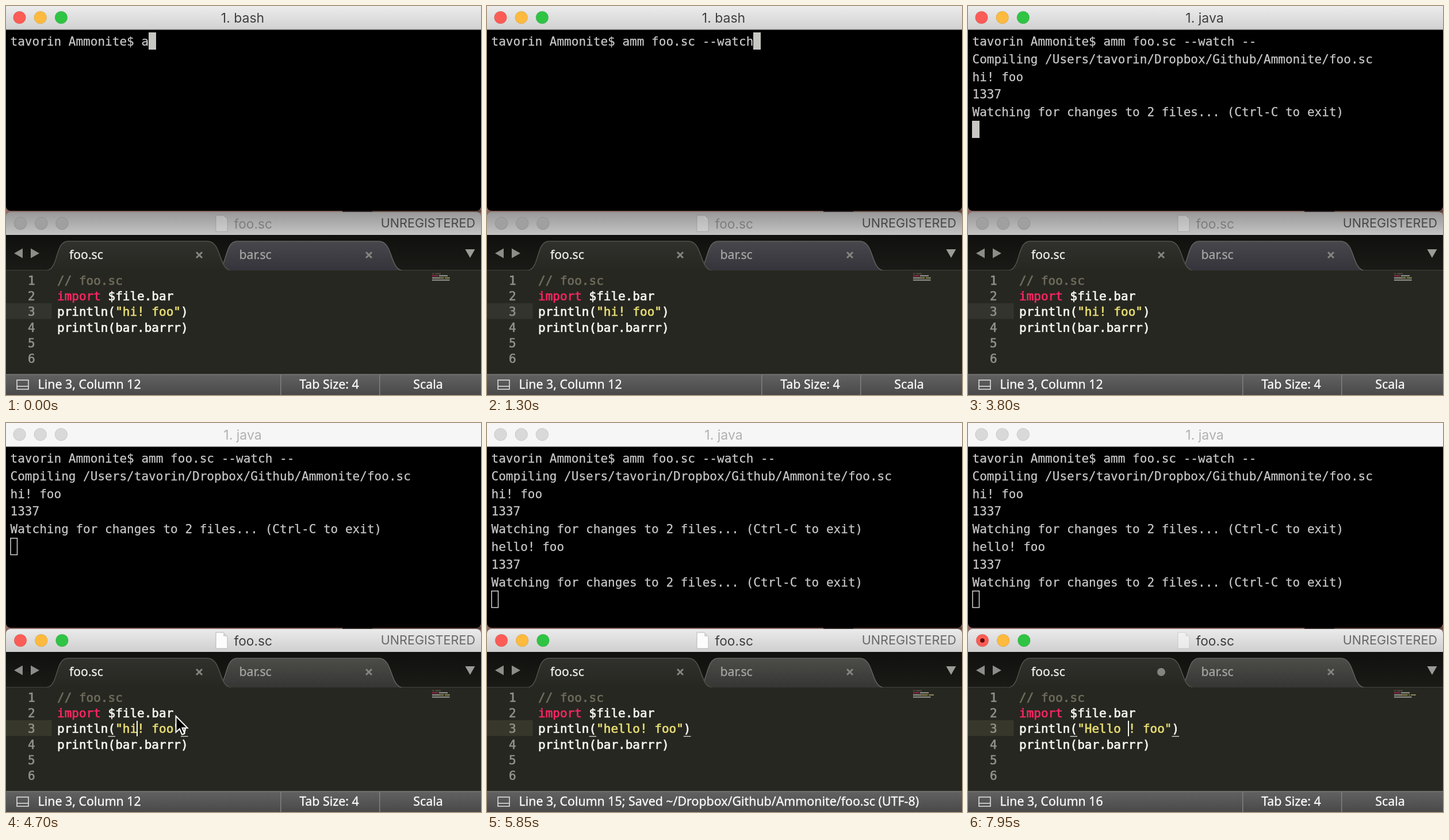
Recreate the animation shown at these times as an HTML page with a canvas. Size 826x678 px, loop 8 s.

```html
<!DOCTYPE html>
<html lang="en">
<head>
<meta charset="utf-8">
<title>Watching a script</title>
<style>
  html, body { margin: 0; width: 100%; height: 100%; overflow: hidden; background: #000; }
  canvas { display: block; }
</style>
</head>
<body>
<canvas id="stage" width="826" height="678"></canvas>
<script>
const W = 826, H = 678, LOOP = 8000;
const ctx = document.getElementById('stage').getContext('2d');

const MONO = '"DejaVu Sans Mono", monospace';
const TITLE = 'Inter, sans-serif';
const UI = '"Noto Sans", sans-serif';
const LIGHTS = ['#fb5c56', '#fdba3e', '#2fc444'];
const WHITE = '#f8f8f2', YELLOW = '#e6db74', PINK = '#f92662', GREY = '#6e6b5c';

// Terminal timing
const KEY = 73, ENTER = 1800, RENAME = 1850, COMPILE = 2700, RUN = 3300, RERUN = 5600;
// Editor timing
const FOCUS = 4400, SAVE = 5400;
const COMMAND = 'amm foo.sc --watch --';
const PROMPT = 'tavorin Ammonite$ ';
const WATCHING = 'Watching for changes to 2 files... (Ctrl-C to exit)';

// Each edit: time and the word before "! foo"
const edits = [[0, 'hi'], [4900, 'h']];
function typeWord(start, step, words) {
  words.forEach((word, i) => edits.push([start + i * step, word]));
}
typeWord(5000, 80, ['he', 'hel', 'hell', 'hello']);
typeWord(6900, 75, ['hell', 'hel', 'he', 'h', '']);
typeWord(7350, 100, ['H', 'He', 'Hel', 'Hell', 'Hello', 'Hello ']);
const FIRST_EDIT = 4900, SECOND_EDIT = 6900;

function rect(x, y, w, h, color) {
  ctx.fillStyle = color;
  ctx.fillRect(x, y, w, h);
}

function text(str, x, y, font, color, align = 'left') {
  ctx.font = font;
  ctx.fillStyle = color;
  ctx.textAlign = align;
  ctx.fillText(str, x, y);
}

// Text with slightly thickened strokes
function heavyText(str, x, y, font, color, heft, align) {
  text(str, x, y, font, color, align);
  ctx.strokeStyle = color;
  ctx.lineWidth = heft;
  ctx.lineJoin = 'round';
  ctx.strokeText(str, x, y);
  ctx.lineJoin = 'miter';
}

function shade(y0, y1, top, bottom) {
  const g = ctx.createLinearGradient(0, y0, 0, y1);
  g.addColorStop(0, top);
  g.addColorStop(1, bottom);
  return g;
}

function poly(points, fill) {
  ctx.beginPath();
  points.forEach(([x, y]) => ctx.lineTo(x, y));
  ctx.closePath();
  ctx.fillStyle = fill;
  ctx.fill();
}

function disc(x, y, r, fill, edge) {
  ctx.beginPath();
  ctx.arc(x, y, r, 0, Math.PI * 2);
  ctx.fillStyle = fill;
  ctx.fill();
  if (edge) {
    ctx.strokeStyle = edge;
    ctx.lineWidth = 1;
    ctx.stroke();
  }
}

function panel(x, y, w, h, radii, fill) {
  ctx.beginPath();
  ctx.roundRect(x, y, w, h, radii);
  ctx.fillStyle = fill;
  ctx.fill();
}

function lights(x, y, active, idle) {
  LIGHTS.forEach((c, i) =>
    disc(x + i * 36.2, y, 10.8, active ? c : idle, 'rgba(0,0,0,.1)'));
}

function drawDesktop() {
  rect(0, 0, W, H, '#8b6a62');
  rect(585, 355, 241, 5, '#5e463d');
  rect(585, 355, 52, 5, '#2b2422');
}

function terminalLines(t) {
  const typed = Math.min(COMMAND.length, 1 + Math.floor(t / KEY));
  const lines = [PROMPT + COMMAND.slice(0, typed)];
  if (t >= COMPILE) lines.push('Compiling /Users/tavorin/Dropbox/Github/Ammonite/foo.sc');
  if (t >= RUN) lines.push('hi! foo', '1337', WATCHING);
  if (t >= RERUN) lines.push('hello! foo', '1337', WATCHING);
  if (t >= ENTER) lines.push('');
  return lines;
}

function drawTerminal(t) {
  const active = t < FOCUS;
  panel(0, 0, W, 357, [0, 0, 8, 8], '#000');
  rect(0, 0, W, 41, active ? shade(0, 41, '#ececec', '#d1d1d1') : '#f6f6f6');
  rect(0, 40, W, 1.5, active ? '#b4b4b4' : '#d2d2d2');
  lights(23.5, 20, active, '#d9d9d9');
  text(t < RENAME ? '1. bash' : '1. java', 411.5, 29, '23px ' + TITLE,
    active ? '#3f3f3f' : '#b1b1b1', 'center');

  const font = '21.04px ' + MONO, pitch = 30.8, advance = 12.667;
  const lines = terminalLines(t);
  lines.forEach((line, i) => heavyText(line, 7.5, 69 + i * pitch, font, '#c9c9c9', .25));

  const last = lines.length - 1;
  const x = Math.round(7.4 + lines[last].length * advance);
  const y = Math.round(45.7 + last * pitch);
  if (active) {
    rect(x, y, 13, 30, '#c7c7c3');
  } else {
    ctx.strokeStyle = '#d4d4d4';
    ctx.lineWidth = 1.5;
    ctx.strokeRect(x + 1, y + .8, 11.5, 28.8);
  }
}

function drawTab(left, right, fill, edge) {
  ctx.beginPath();
  ctx.moveTo(left, 461);
  ctx.bezierCurveTo(left + 20, 456, left + 13, 410, left + 36, 410);
  ctx.lineTo(right - 40, 410);
  ctx.bezierCurveTo(right - 15, 410, right - 21, 456, right, 461);
  ctx.fillStyle = fill;
  ctx.fill();
  ctx.strokeStyle = edge;
  ctx.lineWidth = 1.5;
  ctx.stroke();
}

function drawCross(x, y) {
  ctx.strokeStyle = '#858580';
  ctx.lineWidth = 3;
  ctx.beginPath();
  ctx.moveTo(x - 5, y - 5);
  ctx.lineTo(x + 5, y + 5);
  ctx.moveTo(x + 5, y - 5);
  ctx.lineTo(x - 5, y + 5);
  ctx.stroke();
}

function drawEditorTitle(active, dirty) {
  panel(0, 359, W, 50, [8, 8, 0, 0],
    active ? shade(359, 399, '#ebebeb', '#cfcfcf') : shade(359, 399, '#989898', '#c4c4c4'));
  lights(25, 379, active, '#a0a0a0');
  if (active && dirty) disc(25, 379, 3.8, '#5c0a08');

  ctx.globalAlpha = active ? (dirty ? .55 : 1) : .25;
  poly([[365, 365], [378, 365], [385, 372], [385, 393], [365, 393]], '#fcfcfc');
  ctx.strokeStyle = active ? '#b5b5b5' : '#555';
  ctx.lineWidth = 1;
  ctx.stroke();
  poly([[378, 365], [385, 372], [378, 372]], '#d4d4d4');
  ctx.globalAlpha = 1;

  text('foo.sc', 396.5, 388, '22.7px ' + TITLE, active ? '#3d3d3d' : '#7d7d7d');
  text('UNREGISTERED', 816, 386, '21.6px ' + TITLE, active ? '#686868' : '#484848', 'right');
}

function drawTabs(active, dirty) {
  rect(0, 399, W, 62, shade(399, 461, '#10100e', '#1a1a17'));
  rect(0, 460, W, 1.5, '#43433f');
  drawTab(366, 688, active ? shade(410, 461, '#4c4c49', '#363634')
    : shade(410, 461, '#48474d', '#35343a'), '#62625f');
  drawTab(72, 390, shade(410, 461, '#30312c', '#262720'), '#52534e');
  rect(74, 460, 314, 2, '#262720');

  poly([[14, 431], [29, 422.5], [29, 439.5]], '#8c8c89');
  poly([[58, 431], [43, 422.5], [43, 439.5]], '#8c8c89');
  poly([[798.5, 424], [815.5, 424], [807, 439]], '#9a9a97');

  heavyText('foo.sc', 110, 441, '21.2px ' + UI, '#f0f0ee', .3);
  heavyText('bar.sc', 405.5, 441, '21.2px ' + UI, '#a6a6a3', .3);
  if (dirty) disc(336, 434, 7, '#85857f');
  else drawCross(336, 434);
  drawCross(631, 434);
}

function codeLines(word) {
  return [
    [['// foo.sc', GREY]],
    [['import', PINK], [' $file.bar', WHITE]],
    [['println(', WHITE], ['"' + word + '! foo"', YELLOW], [')', WHITE]],
    [['println(bar.barrr)', WHITE]],
    [], []
  ];
}

function drawMinimap(lines) {
  ctx.globalAlpha = .62;
  lines.forEach((line, row) => {
    let col = 0;
    for (const [part, color] of line) {
      for (const ch of part) {
        if (ch !== ' ') rect(741 + col * 1.7, 465.5 + row * 3.7, 1.5, 2.1, color);
        col++;
      }
    }
  });
  ctx.globalAlpha = 1;
}

function drawPointer(x, y) {
  ctx.beginPath();
  [[0, 0], [0, 28], [6.4, 22], [10.6, 32], [15.2, 30], [11, 20.4], [20, 20.4]]
    .forEach(([dx, dy]) => ctx.lineTo(x + dx, y + dy));
  ctx.closePath();
  ctx.fillStyle = '#000';
  ctx.fill();
  ctx.strokeStyle = '#fff';
  ctx.lineWidth = 2;
  ctx.stroke();
}

function drawCode(t, word, lastEdit, active) {
  const x0 = 89, adv = 12.643, pitch = 27.2, font = '21px ' + MONO, heft = .7;
  rect(0, 461, W, 181, '#262720');
  rect(0, 518, 79.5, 27.5, active ? '#37372b' : '#33342d');

  const lines = codeLines(word);
  lines.forEach((line, i) => {
    const y = 486 + i * pitch;
    heavyText(String(i + 1), 38, y, font, '#8f9089', heft);
    let col = 0;
    for (const [part, color] of line) {
      heavyText(part, x0 + col * adv, y, font, color, heft);
      col += part.length;
    }
  });
  drawMinimap(lines);
  if (!active) return;

  // Matching brackets and caret
  const close = 15 + word.length;
  for (const col of [7, close]) rect(x0 + col * adv, 545.5, 12.6, 1.5, '#c9c9c2');
  if ((t - lastEdit) % 1000 < 500) {
    rect(Math.round(x0 + (9 + word.length) * adv) - 1, 519, 2, 27, WHITE);
  }
  if (t < FIRST_EDIT) drawPointer(295.5, 511);
}

function drawStatus(column, saved) {
  const label = (str, x, align) =>
    heavyText(str, x, 667, '21.36px ' + UI, '#fafafa', .35, align);
  rect(0, 642, W, 36, shade(642, 678, '#626262', '#494949'));
  rect(0, 641.5, W, 1.5, '#7b7b7b');
  ctx.strokeStyle = '#dcdcdc';
  ctx.lineWidth = 1.6;
  ctx.strokeRect(19, 652, 20, 16);
  rect(19, 662, 20, 1.6, '#dcdcdc');

  const note = saved ? '; Saved ~/Dropbox/Github/Ammonite/foo.sc (UTF-8)' : '';
  label('Line 3, Column ' + column + note, 55.5);
  if (saved) return;
  for (const x of [477, 649]) rect(x, 643, 1.5, 35, '#808080');
  label('Tab Size: 4', 562, 'center');
  label('Scala', 734, 'center');
}

function drawEditor(t) {
  const active = t >= FOCUS;
  const [time, word] = edits.filter(e => e[0] <= t).pop();
  const saved = t >= SAVE && t < SECOND_EDIT;
  const dirty = t >= FIRST_EDIT && !saved;
  drawEditorTitle(active, dirty);
  drawTabs(active, dirty);
  drawCode(t, word, Math.max(time, FOCUS), active);
  drawStatus(10 + word.length, saved);
}

const start = performance.now();
function frame() {
  const t = Math.max(0, performance.now() - start) % LOOP;
  drawDesktop();
  drawTerminal(t);
  drawEditor(t);
  requestAnimationFrame(frame);
}
frame();
</script>
</body>
</html>
```
